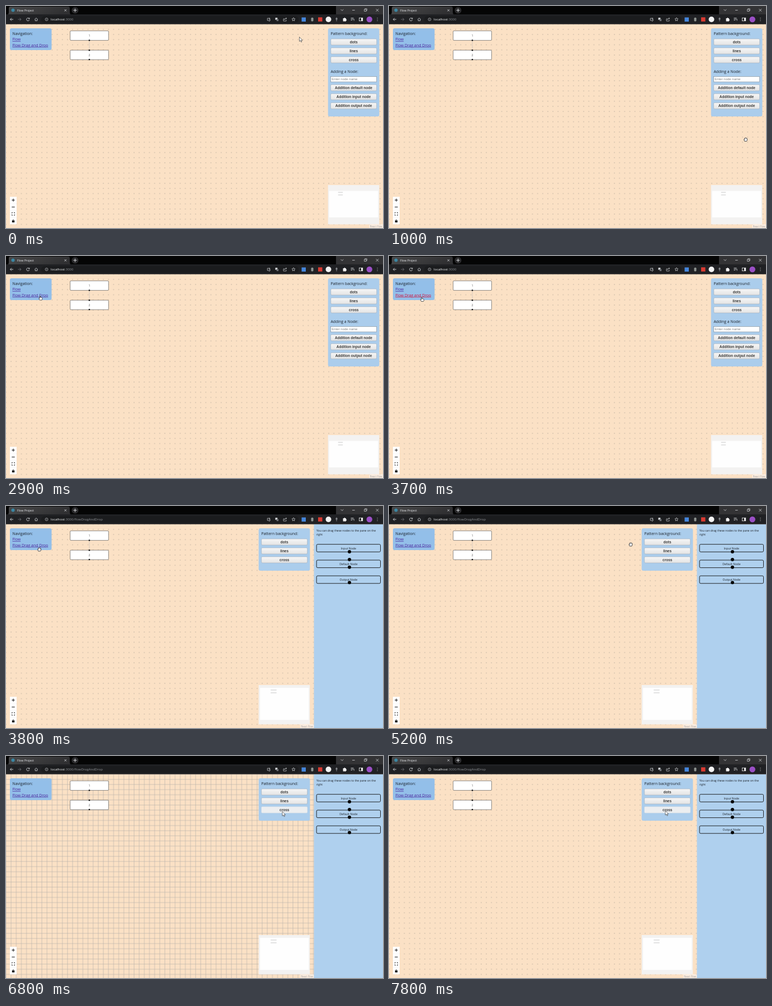
An HTML page that plays this animation: 674 px wide and 398 px high, repeating every 8000 ms.

```html
<!DOCTYPE html>
<html lang="en">
<head>
<meta charset="utf-8">
<title>Flow Project</title>
<style>
html, body { margin: 0; width: 100%; height: 100%; overflow: hidden; background: #fbe1c5; }
svg { display: block; width: 100vw; height: 100vh; }
text { font-family: "Open Sans", "Noto Sans", sans-serif; }
.btn { font: bold 6.5px "Liberation Sans", Arial, sans-serif; fill: #3a3a3a; }
.field { font-family: "Liberation Sans", Arial, sans-serif; }
</style>
</head>
<body>
<svg id="stage" viewBox="0 0 674 398" xmlns="http://www.w3.org/2000/svg"></svg>
<script>
const LOOP = 8000, GAP_X = 9.16, GAP_Y = 9.2, TOP = 32.7;
const stage = document.getElementById('stage');

const rect = (x, y, w, h, fill, more = '') =>
  `<rect x="${x}" y="${y}" width="${w}" height="${h}" fill="${fill}" ${more}/>`;
const circle = (x, y, r, fill, more = '') =>
  `<circle cx="${x}" cy="${y}" r="${r}" fill="${fill}" ${more}/>`;
const path = (d, stroke, width = 1, more = '') =>
  `<path d="${d}" fill="none" stroke="${stroke}" stroke-width="${width}" ${more}/>`;
const text = (x, y, s, size, fill = '#1d232b', more = '') =>
  `<text x="${x}" y="${y}" font-size="${size}" fill="${fill}" ${more}>${s}</text>`;
const mid = 'text-anchor="middle"';

function pattern(id, shape) {
  return `<pattern id="${id}" x="${-GAP_X / 2}" y="${TOP - GAP_Y / 2}" width="${GAP_X}" height="${GAP_Y}"
    patternUnits="userSpaceOnUse">${shape}</pattern>`;
}

function defs() {
  const cx = GAP_X / 2, cy = GAP_Y / 2;
  return `<defs>
    ${pattern('cross', path(`M${cx - 1} ${cy}h2M${cx} ${cy - 1}v2`, '#b9a999', .5))}
    ${pattern('dots', circle(cx, cy, .72, '#a99c94'))}
    ${pattern('lines', path(`M${cx} 0V${GAP_Y}M0 ${cy}H${GAP_X}`, '#aaa6a5', .55))}
    <linearGradient id="face" x2="0" y2="1">
      <stop stop-color="#f6f6f6"/><stop offset="1" stop-color="#e4e4e4"/>
    </linearGradient>
    <linearGradient id="tab" x2="1" y2=".3">
      <stop stop-color="#4a4a4b"/><stop offset="1" stop-color="#303032"/>
    </linearGradient>
  </defs>`;
}

function browser() {
  const w = '#d5d7da';
  return rect(0, 0, 674, 16, '#050505') + rect(590, 0, 84, 15, '#333335') +
    `<path d="M2 15.5Q5 15 5 11V4Q5 1 8 1H111Q114 1 114 4V11Q114 15 117 15.5Z" fill="url(#tab)"/>` +
    rect(0, 15, 674, TOP - 15, '#202124') +
    rect(63, 18, 460, 12.5, '#1b1c1e', 'rx="6"') +
    circle(12.5, 7.5, 3, '#3b87a3') + text(20, 9.8, 'Flow Project', 5.3, '#e8eaed') +
    path('M104.5 6l3.6 3.6m0-3.6l-3.6 3.6', w, .8) +
    circle(123.5, 7.7, 6, '#2a2a2c') + path('M120.5 7.7h6m-3-3v6', w, 1) +
    path('M598.5 6l2.4 2.4L603.3 6M619 7.5h4.6M661.5 5.2l4.6 4.6m0-4.6l-4.6 4.6', w, .8) +
    path('M640.5 6h3.5v3.5h-3.5zM641.7 6v-1.2h3.5v3.5h-1.2', w, .7) +
    path('M13 24H7.5m2.5-2.5L7.5 24l2.5 2.5', w, .9) +
    path('M21.5 24H27m-2.5-2.5L27 24l-2.5 2.5', '#6b6d70', .9) +
    path('M41.5 22.6a2.6 2.6 0 1 0 .3 2.2M41.9 21v2h-2', w, .9) +
    path('M51.3 24L54 21.5 56.7 24M52.2 23.5v3h3.6v-3', w, .8) +
    circle(72.5, 24, 2.5, 'none', `stroke="${w}" stroke-width=".6"`) + path('M72.5 23.6v1.8m0-3.1v.6', w, .6) +
    path('M471.5 22H467.3v4h5v-1.5M470 27.2h1.5M471.2 21v3.2m-1.3-1.2l1.3 1.3 1.3-1.3', w, .7) +
    rect(481.5, 21, 3.8, 3.8, w) + rect(483.7, 23.3, 3.5, 3.8, '#6c6f73') +
    path('M498 23h-2v4h5v-2M497.5 25q.5-2.5 4-2.8m-1.5-1.3l1.7 1.3-1.7 1.5', w, .7) +
    path('M514 20.8l.9 2 2.1.2-1.6 1.5.5 2.2-1.9-1.2-1.9 1.2.5-2.2-1.6-1.5 2.1-.2z', w, .7) +
    rect(528.5, 20.5, 7.5, 7.5, '#4586dc') + rect(545.5, 20.8, 4, 6.8, '#8e9390', 'rx="1.5"') +
    rect(558, 20.3, 7.5, 7.5, '#d83b32') +
    circle(576.5, 24, 5, '#f3f3f3') +
    path('M591 20.5v7', '#85888c', 1) + circle(591, 23, 1.7, '#85888c') +
    `<path d="M602.5 22h2q0-2 1.3-1t.1 1h2.1v2q2 .2 1 1.5t-1 0v2h-5.4z" fill="#f0f0f0"/>` +
    path('M616.5 21.5h5m-5 2h5m-5 2h2.8m2.8-2.5v3.5', w, .8) +
    rect(631.5, 21.3, 6.2, 5.4, 'none', 'stroke="#eee" stroke-width=".8"') + rect(635, 21.3, 2.7, 5.4, '#eee') +
    circle(649.7, 24, 5.2, '#9a4fc4') +
    [21.5, 24, 26.5].map(y => circle(664, y, .6, w)).join('');
}

function button(cx, y, label, hover) {
  const grow = hover ? .5 : 0;
  return rect(cx - 41 - grow / 2, y - grow / 2, 82 + grow, 11 + grow, hover ? '#eceef0' : 'url(#face)',
      `rx="1.8" stroke="${hover ? '#c3d3e2' : '#a4aeb8'}" stroke-width=".6"`) +
    `<text class="btn" x="${cx}" y="${y + 7.8}" ${mid}>${label}</text>`;
}

function patternPanel(x, h, hover) {
  return rect(x, 40, 91.7, h, '#abcdec', 'rx="3"') +
    text(x + 4.7, 52.4, 'Pattern background:', 6.9) +
    ['dots', 'lines', 'cross'].map((s, i) => button(x + 46, 59 + i * 16, s, s === hover)).join('');
}

function navigation(pressed) {
  const link = (y, s, fill) => text(11.5, y, s, 6.9, fill, 'text-decoration="underline"');
  return rect(7, 40, 74.5, 39, '#93bfe9', 'rx="3"') + text(11.5, 52.4, 'Navigation:', 6.9) +
    link(62.3, 'Flow', '#4a269c') +
    link(72.5, 'Flow Drag and Drop', pressed ? '#d0103c' : '#4a269c');
}

function graph() {
  const node = (y, s) => rect(114.7, y, 68.7, 17, '#fff', 'rx="1.4" stroke="#333" stroke-width=".55"') +
    text(149, y + 10.4, s, 5.4, '#555', mid);
  return path('M149 62V79', '#b1b1b7', .5) + node(44.6, 1) + node(79.2, 2) +
    [61.5, 79.3, 96].map(y => circle(149, y, 1.35, '#111')).join('');
}

function controls() {
  return rect(7, 342, 12, 49.5, '#fff') +
    path('M7 354.3h12M7 366.6h12M7 378.9h12', '#eee', .5) +
    path('M10.3 348h5.4m-2.7-2.7v5.4M10.3 360.4h5.4', '#111', 1) +
    path('M10.5 371.7v-1.5h1.6m1.8 0h1.6v1.5m0 2v1.5h-1.6m-1.8 0h-1.6v-1.5', '#111', .8) +
    rect(10.8, 384.7, 4.4, 3.3, '#111') + path('M11.7 385v-1q1.3-2 2.6 0v1', '#111', .8);
}

function miniMap(x, view, nodes) {
  const [vx, vy, vw, vh] = view, [nx, ny, step, w] = nodes;
  return rect(x, 321, 91.5, 70.5, '#f3f2f1') + rect(x + vx, vy, vw, vh, '#fefefe') +
    [0, 1].map(i => rect(x + nx, ny + i * step, w, 1.7, '#dedede')).join('');
}

function credit(right) {
  return rect(right - 24.5, 391.5, 24.5, 6.5, '#fdf0e3') +
    text(right - 1.5, 396.6, 'React Flow', 4.4, '#a09b98', 'text-anchor="end"');
}

function addPanel() {
  return text(580.5, 120, 'Adding a Node:', 6.9) +
    rect(580.5, 126.5, 82, 9.5, '#fff', 'stroke="#7d8790" stroke-width=".6"') +
    text(582.3, 133.2, 'Enter node name', 6, '#858585', 'class="field"') +
    ['default', 'input', 'output'].map((s, i) => button(621.5, 141 + i * 16.2, `Addition ${s} node`)).join('');
}

function sidebar() {
  const item = (y, s) => rect(555.2, y, 114.3, 13.6, 'none', 'rx="2" stroke="#111" stroke-width=".9"') +
    text(612.3, y + 9.1, s, 5.2, '#1d232b', mid);
  return rect(550.5, TOP, 123.5, 398 - TOP, '#afd0ee') +
    text(555, 45.8, 'You can drag these nodes to the pane on the', 5.1) + text(555, 53.4, 'right', 5.1) +
    item(68.7, 'Input Node') + item(97, 'Default Node') + item(125.2, 'Output Node') +
    [82, 96, 109.7, 137.2].map(y => circle(614, y, 3, '#050505')).join('');
}

const cursors = {
  arrow: `<path d="M0 0V8L1.9 6.3 3.2 9.2 4.4 8.7 3.2 5.9H5.6Z" fill="#fff" stroke="#222" stroke-width=".6"/>`,
  hand: `<path d="M-1.8 3.4L-3 .4Q-2.800-.7-1.8 .2V-2Q-1.2-2.900-.7-2.3.1-3.4.8-2.3 1.700-2.900 2-1.7 2.900-1.8 2.9-.7V1.5L2 3.4Z"
    fill="#fff" stroke="#333" stroke-width=".9"/>` + path('M-.6-2v1.800M.7-2v1.800M1.900-1.600v1.500', '#555', .4),
  point: `<path d="M-1.8 4L-3.3 .9Q-2.8-.1-1.7 .9V-3.5Q-1-4.5-.5-3.5V-.8Q.7-1.3 1.2-.5 2.5-.7 2.8 .8V2.5L2 4Z"
    fill="#fff" stroke="#222" stroke-width=".7"/>`
};

// time, x, y, cursor from then on
const moves = [
  [0, 524.5, 55.5, 'arrow'], [300, 586, 100, 'arrow'], [600, 628, 206, 'hand'], [800, 637.5, 237, 'hand'],
  [900, 637.5, 237, 'hand'], [1100, 637.5, 241, 'hand'], [1700, 637.5, 241, 'hand'],
  [1800, 248.5, 128, 'hand'], [1900, 248.5, 128, 'hand'], [2100, 127, 116, 'hand'], [2400, 127, 116, 'hand'],
  [2800, 70, 82, 'hand'], [2900, 62, 75, 'point'], [3000, 57, 73, 'point'], [3200, 57, 73, 'point'],
  [3400, 59.5, 77.5, 'point'], [3800, 59.5, 77.5, 'hand'], [4800, 59.5, 77.5, 'hand'],
  [5200, 432, 68.5, 'hand'], [5300, 466, 66, 'arrow'], [5700, 503, 66, 'arrow'], [5900, 503, 66, 'arrow'],
  [6200, 500, 81, 'arrow'], [6600, 500, 81, 'arrow'], [6800, 494, 99.5, 'arrow'],
  [7600, 494, 99.5, 'arrow'], [7800, 494, 98, 'arrow'], [LOOP, 494, 98, 'arrow']
];

function pointer(t) {
  const next = moves.findIndex(m => m[0] > t);
  const a = moves[next - 1], b = moves[next];
  const p = (t - a[0]) / (b[0] - a[0]);
  return { x: a[1] + (b[1] - a[1]) * p, y: a[2] + (b[2] - a[2]) * p, kind: a[3] };
}

function scene(t) {
  const drag = t >= 3800, { x, y, kind } = pointer(t);
  const variant = t < 5900 || t >= 6900 ? 'cross' : t < 6400 ? 'dots' : 'lines';
  const over = top => y >= top && y <= top + 11;
  const onPanel = drag && kind === 'arrow' && x > 456 && x < 539;
  const hover = onPanel && ['dots', 'lines', 'cross'].find((s, i) => over(59 + i * 16));
  const page = drag
    ? patternPanel(451.7, 76, hover) + miniMap(451.7, [2.5, 326, 87, 57.5], [21.5, 329, 5, 10.5]) +
      credit(550.5) + sidebar()
    : patternPanel(575.7, 158) + addPanel() +
      miniMap(575.7, [2, 331.5, 87.5, 47.5], [18, 333.3, 4.5, 8.5]) + credit(674);
  return defs() + rect(0, TOP, 674, 398 - TOP, '#fbe1c5') + rect(0, TOP, 674, 398 - TOP, `url(#${variant})`) +
    graph() + page + navigation(t >= 3700 && t < 3800) + controls() + browser() +
    text(80, 26.2, `localhost<tspan fill="#8f9296">:3000${drag ? '/flowDragAndDrop' : ''}</tspan>`, 6, '#f4f5f6') +
    `<g transform="translate(${x} ${y})">${cursors[kind]}</g>`;
}

let shown = -1;
function frame(now) {
  const t = Math.floor(now % LOOP / 100) * 100;
  if (t !== shown) stage.innerHTML = scene(shown = t);
  requestAnimationFrame(frame);
}
requestAnimationFrame(frame);
</script>
</body>
</html>
```
